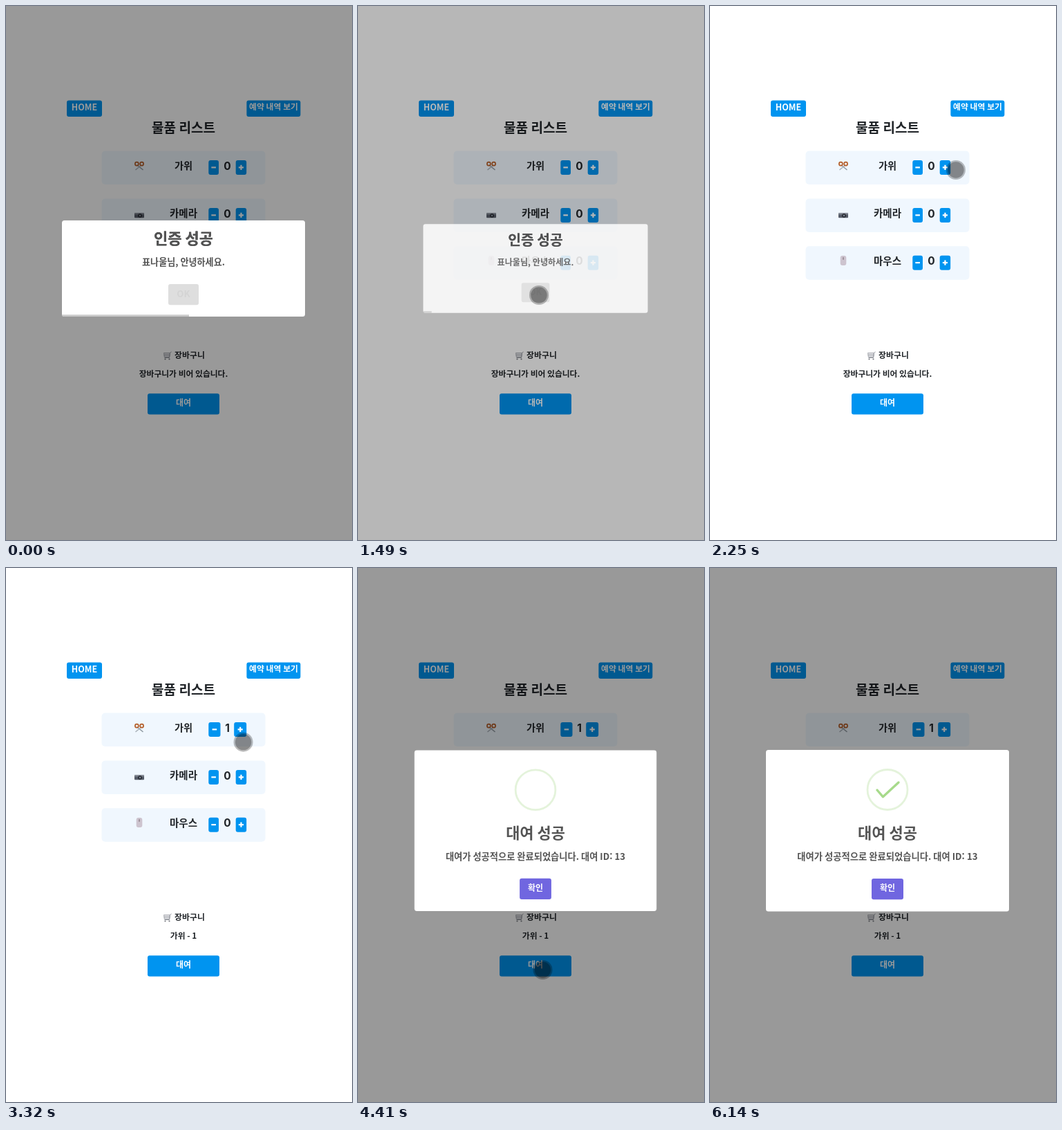
These frames come from a looping animation (501 by 772 pixels, 6.69 s). An HTML page with a canvas:

```html
<!DOCTYPE html>
<html lang="ko">
<head>
<meta charset="utf-8">
<style>
  html, body { margin: 0; width: 100%; height: 100%; overflow: hidden; background: #fff; }
  canvas { display: block; }
</style>
</head>
<body>
<canvas id="stage" width="501" height="772"></canvas>
<script>
const ctx = document.getElementById('stage').getContext('2d');
const LOOP = 6690;
const SANS = '"Noto Sans CJK KR", "Noto Sans CJK", "Noto Sans", sans-serif';
const DIGITS = 'Inter, "Noto Sans", sans-serif';
const BLUE = '#0094f0', INK = '#212529', GREY = '#545454', PURPLE = '#7066e0';

// Bursts of motion: start, end, intervals. The screen rests in between.
const bursts = [
  [70, 700, 9], [750, 1370, 9], [1420, 1630, 3], [1840, 2250, 6], [2450, 2660, 3],
  [2920, 2990, 1], [3320, 3810, 7], [4070, 4680, 9], [4750, 5220, 7], [5810, 6140, 5]
];

// Pointer moves: start, end, target x, target y.
const moves = [
  [30, 700, 265, 449], [700, 1370, 262, 418], [1770, 2250, 356, 237], [2390, 2660, 347, 237],
  [3250, 3810, 268, 578], [4020, 4205, 267.5, 581], [4480, 5220, 254.5, 469.5], [5740, 6110, 450, 772]
];
const presses = [[1420, 1470], [2920, 2980], [4260, 4330]];

const clamp = v => Math.min(1, Math.max(0, v));
const span = (t, a, b) => clamp((t - a) / (b - a));
const mix = (a, b, u) => a + (b - a) * u;
const smooth = u => u * u * (3 - 2 * u);

// CSS "ease" = cubic-bezier(.25, .1, .25, 1)
function ease(x) {
  let lo = 0, hi = 1, s = 0.5;
  for (let i = 0; i < 20; i++) {
    s = (lo + hi) / 2;
    const bx = 0.75 * s * (1 - s) + s * s * s;
    if (bx < x) lo = s; else hi = s;
  }
  return 0.3 * s * (1 - s) * (1 - s) + 3 * s * s * (1 - s) + s * s * s;
}

function stepTime(t) {
  let q = 0;
  for (const [a, b, n] of bursts) {
    if (t < a) break;
    const d = (b - a) / n;
    q = a + d * Math.min(n, Math.floor((t - a) / d + 0.1));
  }
  return q;
}

function box(x, y, w, h, r, fill) {
  ctx.fillStyle = fill;
  ctx.beginPath();
  ctx.roundRect(x, y, w, h, r);
  ctx.fill();
}

function disc(x, y, r, fill) {
  ctx.fillStyle = fill;
  ctx.beginPath();
  ctx.arc(x, y, r, 0, Math.PI * 2);
  ctx.fill();
}

function ring(x, y, r, w, color) {
  ctx.strokeStyle = color;
  ctx.lineWidth = w;
  ctx.beginPath();
  ctx.arc(x, y, r, 0, Math.PI * 2);
  ctx.stroke();
}

function line(color, w, ...pts) {
  ctx.strokeStyle = color;
  ctx.lineWidth = w;
  ctx.beginPath();
  pts.forEach(([x, y]) => ctx.lineTo(x, y));
  ctx.stroke();
}

function label(str, x, y, size, color = INK, font = SANS) {
  ctx.font = `700 ${size}px ${font}`;
  ctx.textAlign = 'center';
  ctx.fillStyle = color;
  ctx.fillText(str, x, y + size * 0.37);
}

function scissors(x, y) {
  line('#8f9aa3', 1.6, [x - 3, y - 1], [x + 5.5, y + 6]);
  line('#a9b2ba', 1.6, [x + 3, y - 1], [x - 5.5, y + 6]);
  ring(x - 3.6, y - 2.8, 2.5, 1.7, '#b5602c');
  ring(x + 3.6, y - 2.8, 2.5, 1.7, '#b5602c');
}

function camera(x, y) {
  box(x - 7, y - 3.5, 14, 7, 1, '#565c68');
  box(x - 7, y - 3.5, 14, 2, 1, '#8a909a');
  disc(x + 1, y + 0.3, 2.8, '#25282f');
  disc(x + 1, y + 0.3, 1.3, '#7e8896');
}

function mouse(x, y) {
  box(x - 4.3, y - 7, 8.6, 14, 3, '#cdc4cf');
  box(x - 0.8, y - 5, 1.6, 4, 0.8, '#93868f');
}

function cart(x, y) {
  box(x - 5, y - 4, 9, 6, 0, '#d9dade');
  line('#8d9097', 1, [x + 6, y - 5.5], [x + 4, y - 4], [x + 3, y + 3], [x - 4, y + 3]);
  line('#a2a5ab', 0.8, [x - 5, y - 4], [x + 4, y - 4], [x + 3, y + 2], [x - 4, y + 2], [x - 5, y - 4]);
  line('#a2a5ab', 0.8, [x - 5, y - 1], [x + 4, y - 1]);
  disc(x - 3, y + 5, 1.1, '#777a80');
  disc(x + 3, y + 5, 1.1, '#777a80');
}

function row(y, name, icon, iconDy, count) {
  box(138.5, y - 21.5, 237, 48.5, 5, '#f0f7fe');
  icon(193, y + iconDy);
  label(name, 257, y, name.length > 2 ? 14.5 : 14.2);
  const w = count ? 17.2 : 14.7;
  const plusW = w + 0.8;
  box(293.3, y - 8, w, 21, 3, BLUE);
  box(348.2 - plusW, y - 8, plusW, 21, 3, BLUE);
  const mx = 293.3 + w / 2, px = 348.2 - plusW / 2, cy = y + 2.4;
  line('#fff', 2.2, [mx - 3.3, cy], [mx + 3.3, cy]);
  line('#fff', 2.2, [px - 3.6, cy], [px + 3.6, cy]);
  line('#fff', 2.2, [px, cy - 3.6], [px, cy + 3.6]);
  label(String(count), 320.5, y, 15.5, INK, DIGITS);
}

function page(count) {
  ctx.fillStyle = '#fff';
  ctx.fillRect(0, 0, 501, 772);
  box(88, 136.5, 51, 23.5, 3, BLUE);
  label('HOME', 113.5, 146, 12.5, '#fff');
  box(348.4, 136.5, 78, 23.5, 3, BLUE);
  label('예약 내역 보기', 387.5, 146, 11.9, '#fff');
  label('물품 리스트', 257, 175.5, 19.1);
  row(231, '가위', scissors, 0, count);
  row(300, '카메라', camera, 2.8, 0);
  row(368.7, '마우스', mouse, -0.7, 0);
  cart(233.5, 505.5);
  label('장바구니', 266, 505, 11.9);
  label(count ? `가위 - ${count}` : '장바구니가 비어 있습니다.', 257, 532, 11.8);
  box(205, 560.3, 104, 30.2, 3, BLUE);
  label('대여', 257, 573.5, 12, '#fff');
}

function dim(alpha) {
  ctx.fillStyle = `rgba(0,0,0,${alpha})`;
  ctx.fillRect(0, 0, 501, 772);
}

function popup(top, h, scale, alpha, body) {
  const cy = top + h / 2;
  ctx.save();
  ctx.globalAlpha = alpha;
  ctx.translate(257, cy);
  ctx.scale(scale, scale);
  ctx.translate(-257, -cy);
  box(81, top, 352, h, 3.5, '#fff');
  body();
  ctx.restore();
}

function welcome(t) {
  const hide = ease(span(t, 1470, 1620));
  if (hide >= 1) return;
  dim(0.4 * (1 - ease(span(t, 1470, 1570))));
  popup(310, 139, 1 - hide / 2, 1 - hide, () => {
    label('인증 성공', 257, 335.5, 22);
    label('인증 성공', 257, 335.5, 22, GREY);
    label('표나울님, 안녕하세요.', 257, 370, 13.1, GREY);
    const closing = hide > 0, hover = t > 1100;
    box(235, 402, 44, 30.3, 3, closing ? '#dedede' : hover ? '#655cca' : PURPLE);
    label('OK', 257, 416, 13.3, closing ? '#d4d4d4' : '#fff');
    const end = 265 - 0.1146 * t;
    if (end > 81) box(81, 446.3, end - 81, 2.7, [0, 0, 0, 3], '#cacaca');
  });
}

function popScale(u) {
  if (u < 0.45) return mix(0.7, 1.05, ease(u / 0.45));
  if (u < 0.8) return mix(1.05, 0.95, ease((u - 0.45) / 0.35));
  return mix(0.95, 1, ease((u - 0.8) / 0.2));
}

function checkMark(t) {
  const tip = smooth(span(t, 4740, 4860)), long = smooth(span(t, 4860, 5040));
  if (!tip) return;
  ctx.lineCap = ctx.lineJoin = 'round';
  const pts = [[242, 321], [mix(242, 250.5, tip), mix(321, 330.8, tip)]];
  if (long) pts.push([mix(250.5, 273, long), mix(330.8, 310, long)]);
  line('#a7da8b', 3.4, ...pts);
  ctx.lineCap = 'butt';
  ctx.lineJoin = 'miter';
}

function success(t) {
  dim(0.4 * ease(span(t, 4300, 4400)));
  if (t < 4335) return;
  popup(263, 233.5, popScale(span(t, 4335, 4635)), 1, () => {
    ring(257, 320.5, 29, 2.8, '#e4f3db');
    checkMark(t);
    label('대여 성공', 257, 382.5, 22, GREY);
    label('대여가 성공적으로 완료되었습니다. 대여 ID: 13', 257, 417.5, 13.3, GREY);
    box(234, 449, 46, 30.3, 3, PURPLE);
    label('확인', 257, 463, 12, '#fff');
  });
}

function pointer(t) {
  if (t < 70 || t >= 6135) return;
  let x = 438, y = 758;
  for (const [a, b, tx, ty] of moves) {
    const u = smooth(span(t, a, b));
    x = mix(x, tx, u);
    y = mix(y, ty, u);
  }
  if (presses.some(([a, b]) => t >= a && t < b)) {
    disc(x, y, 15, 'rgba(206,214,50,.62)');
    disc(x, y, 12, 'rgba(92,142,52,.6)');
  } else {
    disc(x, y, 14, 'rgba(0,0,0,.26)');
    disc(x, y, 11.7, 'rgba(0,0,0,.27)');
  }
}

function draw(now) {
  const t = stepTime(now % LOOP);
  page(t >= 2985 ? 1 : 0);
  if (t < 1630) welcome(t);
  if (t >= 4300) success(t);
  pointer(t);
  requestAnimationFrame(draw);
}
requestAnimationFrame(draw);
</script>
</body>
</html>
```
